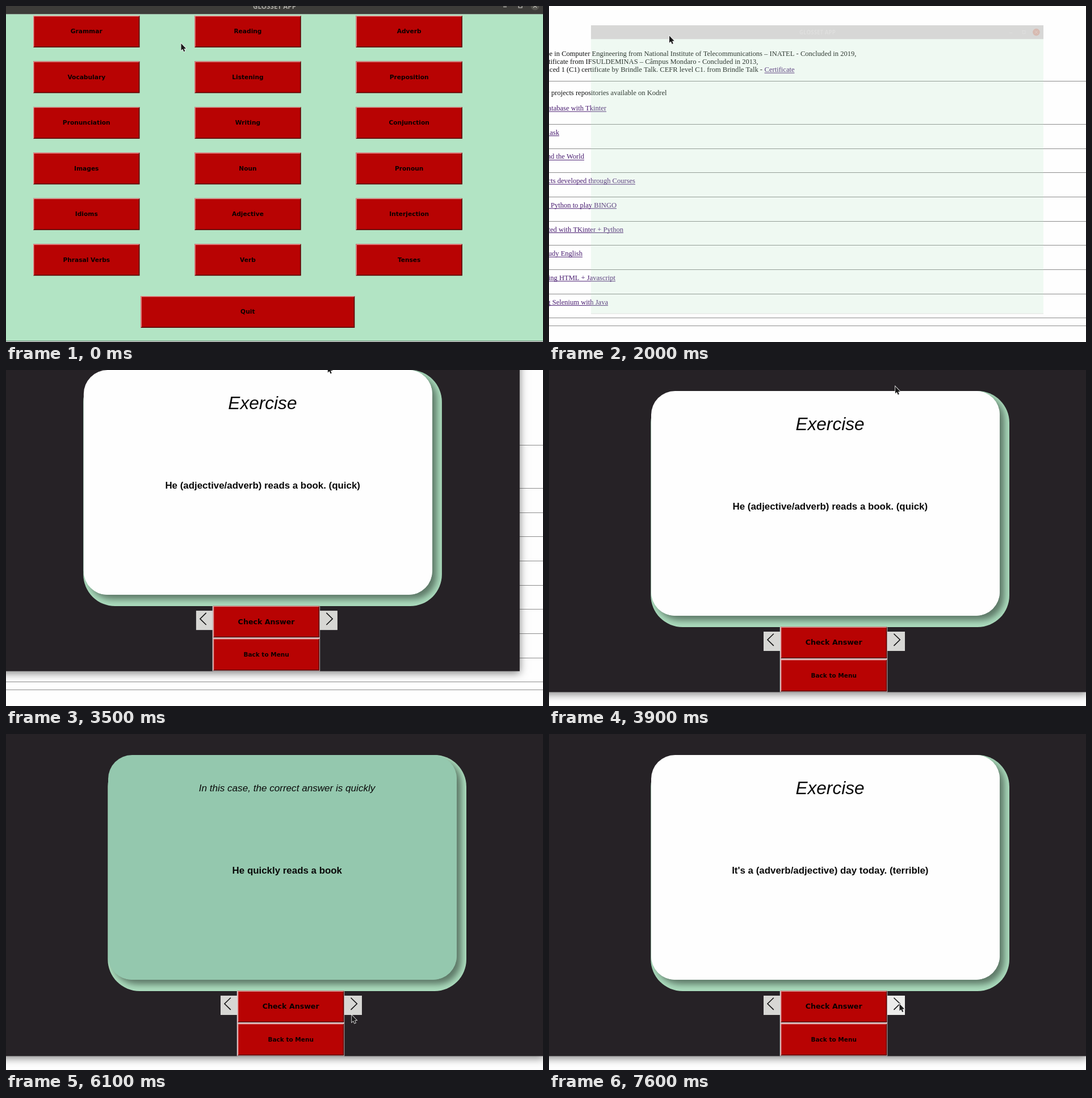
Write an HTML page with a canvas that moves like this. It is 946x592 px and loops after 8000 ms.

```html
<!DOCTYPE html>
<html lang="en">
<head>
<meta charset="utf-8">
<title>Grammar cards</title>
<style>
html, body { margin: 0; width: 100%; height: 100%; overflow: hidden; background: #fefefe; }
canvas { display: block; }
</style>
</head>
<body>
<canvas id="stage" width="946" height="592"></canvas>
<script>
const ctx = document.getElementById('stage').getContext('2d');
const LOOP = 8000;
const STEP = 100;
const RED = { fill: '#b80303', light: '#ec8b8b', dark: '#5c0202', text: '#0c0000' };
const BLUE = { fill: '#1b97c5', light: '#a9cdee', dark: '#0f4b8c', text: '#f4fbff' };
const UI = '"DejaVu Sans", sans-serif';
const SANS = '"Liberation Sans", Arial, sans-serif';
const SERIF = '12.55px "Liberation Serif", serif';

const MENU = [
  ['Grammar', 'Vocabulary', 'Pronunciation', 'Images', 'Idioms', 'Phrasal Verbs'],
  ['Reading', 'Listening', 'Writing', 'Noun', 'Adjective', 'Verb'],
  ['Adverb', 'Preposition', 'Conjunction', 'Pronoun', 'Interjection', 'Tenses']
];

// Right edge and text of each project link
const LINKS = [
  [101, 'Project of a Database with Tkinter'],
  [18, 'Web project with Flask'],
  [62, 'Game Around the World'],
  [152, 'Other projects developed through Courses'],
  [119, 'Program in Python to play BINGO'],
  [131, 'Calculator created with TKinter + Python'],
  [59, 'Program to study English'],
  [117, 'Game made using HTML + Javascript'],
  [104, 'Tests using Selenium with Java']
];

const question = (from, text) =>
  ({ from, fill: '#fefefe', head: 'Exercise', size: 31.6, base: 106, text });
const answer = (from, word, text) =>
  ({ from, fill: '#94c8ae', head: 'In this case, the correct answer is ' + word, size: 17.1, base: 101, text });

const CARDS = [
  question(0, 'He (adjective/adverb) reads a book. (quick)'),
  answer(5000, 'quickly', 'He quickly reads a book'),
  question(6300, 'She is a (adjective/adverb) driver. (careful)'),
  answer(6800, 'careful', 'She is a careful driver'),
  question(7500, "It's a (adverb/adjective) day today. (terrible)")
];

// Each leg: first step, last step, x, y
const WINDOW_PATH = [[0, 0, -97, -83], [3400, 3900, 0, 0]];
const POINTER_PATH = [
  [0, 0, 308.5, 66], [100, 100, 302, 66], [600, 800, 212, 58], [1100, 1100, 212, 52.5],
  [2100, 2700, 460, 332], [2800, 2900, 400, 158],
  [3400, 3400, 513, -54], [3400, 3900, 610, 29],
  [4300, 4600, 487, 470], [4800, 4800, 486.5, 466.5],
  [5700, 6000, 603, 507], [6100, 6300, 614, 486],
  [6500, 6700, 520, 480], [6900, 7100, 614, 485], [7400, 7600, 617.5, 475.5]
];

const clamp = v => Math.min(1, Math.max(0, v));
const easeOut = k => 1 - (1 - clamp(k)) ** 2;

function follow(path, t) {
  let x = 0, y = 0;
  for (const [first, last, toX, toY] of path) {
    const p = easeOut((t - first + STEP) / (last - first + STEP));
    x += (toX - x) * p;
    y += (toY - y) * p;
  }
  return [x, y];
}

function rect(x, y, w, h, color) {
  ctx.fillStyle = color;
  ctx.fillRect(x, y, w, h);
}

function rounded(x, y, w, h, r, color) {
  ctx.beginPath();
  ctx.roundRect(x, y, w, h, r);
  ctx.fillStyle = color;
  ctx.fill();
}

function label(text, x, y, font, color, align = 'center') {
  ctx.font = font;
  ctx.fillStyle = color;
  ctx.textAlign = align;
  ctx.fillText(text, x, y);
}

function poly(points, close) {
  ctx.beginPath();
  points.forEach(([x, y]) => ctx.lineTo(x, y));
  if (close) ctx.closePath();
}

function shadow(color, blur, dx, dy) {
  ctx.shadowColor = color;
  ctx.shadowBlur = blur;
  ctx.shadowOffsetX = dx;
  ctx.shadowOffsetY = dy;
}

// Windows fade and grow from 80% as p goes from 0 to 1
function appear(cx, cy, p, draw) {
  if (p <= 0) return;
  const scale = 0.8 + 0.2 * p;
  ctx.save();
  ctx.globalAlpha = p;
  ctx.translate(cx, cy);
  ctx.scale(scale, scale);
  ctx.translate(-cx, -cy);
  draw();
  ctx.restore();
}

function button(text, x, y, w, h, skin, size, sunken = false) {
  const b = 1.7;
  const [near, far] = sunken ? [skin.dark, skin.light] : [skin.light, skin.dark];
  rect(x, y, w, h, far);
  ctx.fillStyle = near;
  poly([[x, y], [x + w, y], [x + w - b, y + b], [x + b, y + b], [x + b, y + h - b], [x, y + h]], true);
  ctx.fill();
  rect(x + b, y + b, w - 2 * b, h - 2 * b, skin.fill);
  const shift = sunken ? 1 : 0;
  label(text, x + w / 2 + shift, y + h / 2 + size * 0.32 + shift, `bold ${size}px ${UI}`, skin.text);
}

function link(text, right, y) {
  label(text, right, y, SERIF, '#481b70', 'right');
  const w = ctx.measureText(text).width;
  rect(right - w, y + 1.5, w, 1, '#481b70');
}

function drawPage() {
  rect(0, 0, 946, 592, '#fefefe');
  const line = (text, right, y) => label(text, right, y, SERIF, '#111', 'right');
  line("Bachelor's degree in Computer Engineering from National Institute of Telecommunications – INATEL - Concluded in 2019,", 541.5, 88);
  line('Technician certificate from IFSULDEMINAS – Câmpus Mondaro - Concluded in 2013,', 368.5, 102);
  line('Advanced 1 (C1) certificate by Brindle Talk. CEFR level C1. from Brindle Talk -', 376, 116);
  link('Certificate', 432.5, 116);
  line('My projects repositories available on Kodrel', 207.5, 157);
  LINKS.forEach(([right, text], i) => link(text, right, 184 + i * 42.7));
  rect(0, 132, 946, 1, '#8c8c8c');
  for (let i = 0; i < 9; i++) rect(0, Math.round(208 + i * 42.65), 946, 1, '#8c8c8c');
  rect(0, 563, 946, 1, '#8c8c8c');
}

function drawMenu(closing, hover) {
  rect(-2, -14.4, 949, 29, '#3d3c39');
  rect(-2, 14.6, 949, 575.4, '#b2e4c4');
  rect(-2, 590, 949, 1, '#4a5a50');
  label('GLOSSET APP', 473, 5, 'bold 11.7px "Open Sans", sans-serif', closing ? '#fff' : '#aaa8a3');
  ctx.fillStyle = closing ? '#d9481c' : '#565550';
  ctx.beginPath();
  ctx.arc(932, 0, 7.5, 0, 7);
  ctx.fill();
  ctx.strokeStyle = closing ? '#fff' : '#c4c2bc';
  ctx.lineWidth = 1.2;
  ctx.strokeRect(903, -3, 6, 6);
  for (const line of [[[876, 1.5], [882, 1.5]], [[929, -3], [935, 3]], [[935, -3], [929, 3]]]) {
    poly(line);
    ctx.stroke();
  }
  if (closing) return;
  MENU.forEach((column, c) => column.forEach((text, r) =>
    button(text, 48 + c * 284.2, 17 + r * 80.45, 187.5, 56, hover && !c && !r ? BLUE : RED, 10.65)));
  button('Quit', 237.3, 511, 377, 56, RED, 10.65);
}

function navButton(x, w, tip, dir, hover) {
  rect(x, 461, w, 34, hover ? '#ececea' : '#d7d7d4');
  ctx.strokeStyle = '#111';
  ctx.lineWidth = 1.6;
  poly([[tip - 10.8 * dir, 464.7], [tip, 475.3], [tip - 10.8 * dir, 485.9]]);
  ctx.stroke();
}

function drawCards(t, x, y) {
  ctx.save();
  shadow('rgba(0,0,0,.5)', 14, 0, 3);
  rect(-40, -60, 988, 627.5, '#262226');
  ctx.restore();

  const card = CARDS.findLast(c => t >= c.from);
  const face = () => rounded(180, 37, 614, 396, 42, card.fill);
  ctx.save();
  rounded(179.3, 37, 631.7, 416, 56, '#abdcbd');
  ctx.clip();
  shadow('rgba(0,0,0,.45)', 12, 8, 8);
  face();
  ctx.restore();
  face();
  label(card.head, 495, card.base, `italic ${card.size}px ${SANS}`, '#0a0a0a');
  label(card.text, 495.3, 246, `bold 16.9px ${SANS}`, '#0a0a0a');

  const over = (left, top, right, bottom) => x >= left && x < right && y >= top && y < bottom;
  const pressed = t === 4900 || t === 6700;
  navButton(378, 29, 385, -1, over(378, 461, 407, 495));
  navButton(596, 31, 618.3, 1, over(596, 461, 627, 495));
  rect(406.8, 453, 189.4, 114.4, '#d9d9d9');
  button('Check Answer', 408, 452.6, 187.4, 55.6, over(407, 453, 596, 509) ? BLUE : RED, 12.65, pressed);
  button('Back to Menu', 408, 510, 187.4, 56.5, RED, 10.5);
}

function drawPointer(x, y) {
  ctx.save();
  ctx.translate(x, y);
  poly([[0, 0], [0, 12.3], [2.8, 9.8], [4.8, 14.4], [6.8, 13.5], [4.9, 9.2], [8.6, 8.9]], true);
  ctx.lineWidth = 1.6;
  ctx.strokeStyle = '#f2f2f2';
  ctx.stroke();
  ctx.fillStyle = '#1a1a1a';
  ctx.fill();
  ctx.restore();
}

function draw(t) {
  const [x, y] = follow(POINTER_PATH, t);
  const [dx, dy] = follow(WINDOW_PATH, t);
  drawPage();
  appear(472.5, 288, 1 - easeOut((t - 1917) / 150), () => drawMenu(t >= 1900, x < 236 && y < 73));
  ctx.save();
  ctx.translate(dx, dy);
  appear(454, 254, easeOut((t - 2250) / 150), () => drawCards(t, x - dx, y - dy));
  ctx.restore();
  drawPointer(x, y);
}

const start = performance.now();
function frame() {
  const t = (performance.now() - start) % LOOP;
  draw(Math.floor(t / STEP) * STEP);
  requestAnimationFrame(frame);
}
frame();
</script>
</body>
</html>
```
